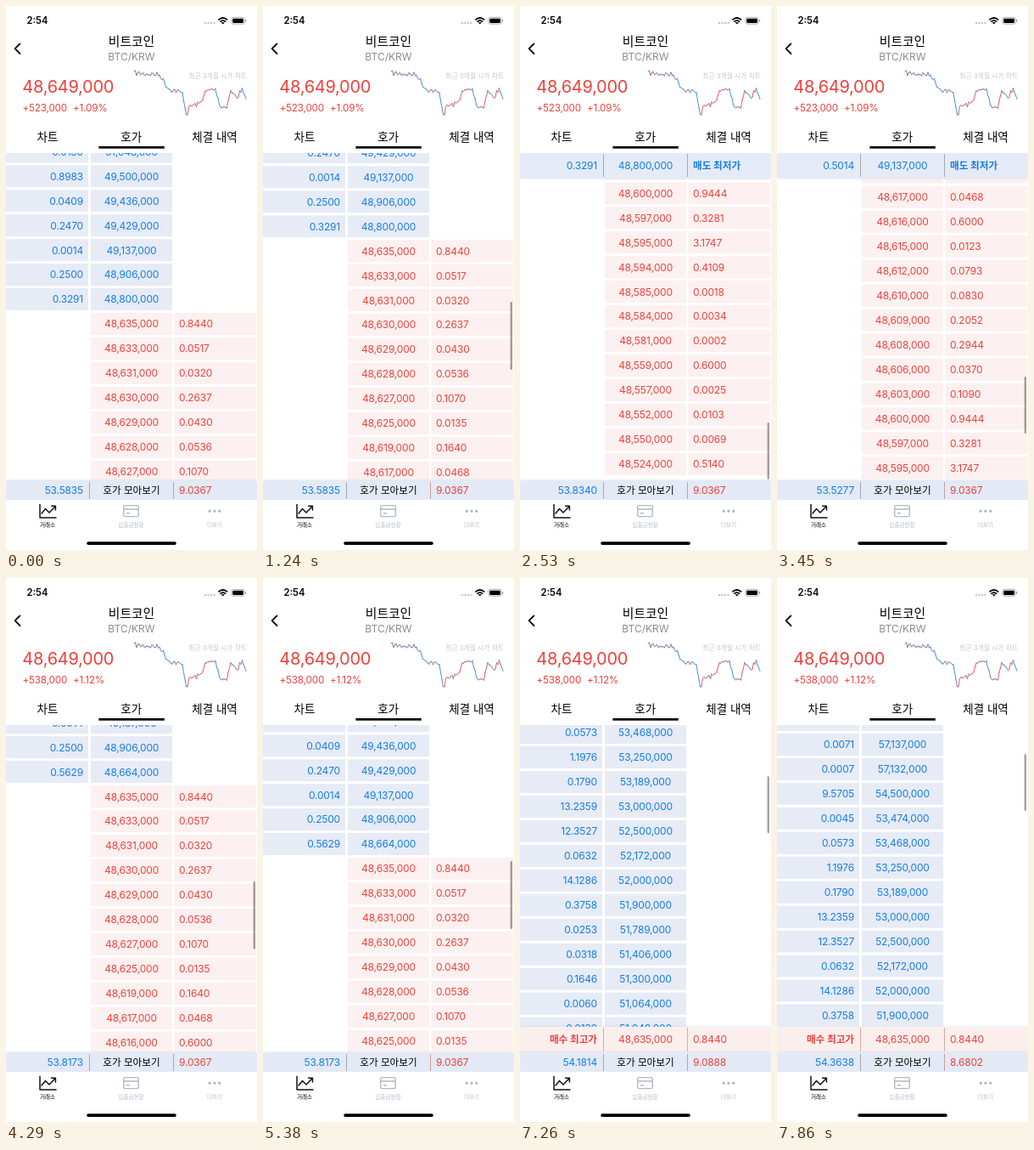
Recreate the animation shown at these times as an HTML page. Size 296 by 640 pixels, loop 8000 ms.

```html
<!DOCTYPE html>
<html lang="ko">
<head>
<meta charset="utf-8">
<title>호가</title>
<style>
html, body { margin: 0; width: 100%; height: 100%; overflow: hidden; background: #fff; }
svg { display: block; width: 296px; height: 640px; }
text { font-family: Inter, "Noto Sans CJK KR", "Noto Sans CJK JP", "Noto Sans CJK", sans-serif; }
.num { font-size: 12px; letter-spacing: -.18px; }
.small { font-size: 11.7px; }
.ko { font-size: 11.6px; }
.bold { font-weight: 700; }
.mid { text-anchor: middle; }
.end { text-anchor: end; }
.ask { fill: #147de8; }
.bid { fill: #ee403c; }
.ask-bg { fill: #e6ebf5; }
.bid-bg { fill: #fcf1f0; }
.tab { font-size: 13.5px; }
.nav { font-size: 6.6px; }
.off { fill: #b4b8c6; }
.rule { stroke: #a3a8b2; stroke-width: 1; }
</style>
</head>
<body>
<svg viewBox="0 0 296 640">
  <defs>
    <clipPath id="view"><rect y="173" width="296" height="385"/></clipPath>
    <filter id="soft" x="-5%" y="-30%" width="110%" height="160%">
      <feDropShadow dx="0" dy="0" stdDeviation="1.2" flood-color="#506080" flood-opacity=".22"/>
    </filter>
  </defs>
  <rect width="296" height="640" fill="#fff"/>

  <g clip-path="url(#view)"><g id="book"></g></g>

  <g id="topBar">
    <rect y="173" width="296" height="30" rx="3" fill="#e4ebf6" filter="url(#soft)"/>
    <path class="rule" d="M98.5 174V201M197.5 174V201"/>
    <text id="topQty" class="num ask end" x="91" y="191.5"></text>
    <text id="topPrice" class="num ask mid" x="148" y="191.5"></text>
    <text class="ko ask bold" x="204" y="191.5">매도 최저가</text>
  </g>
  <g id="lowBar">
    <rect y="528" width="296" height="30" rx="3" fill="#fbefee" filter="url(#soft)"/>
    <path class="rule" d="M98.5 529V557M197.5 529V557" style="stroke:#d9a9a8"/>
    <text class="ko bid bold end" x="91" y="547.3">매수 최고가</text>
    <text class="num bid mid" x="148" y="547.4">48,635,000</text>
    <text class="num bid" x="204" y="547.4">0.8440</text>
  </g>
  <rect id="thumb" x="291.6" width="2.4" rx="1.2" fill="#000" fill-opacity=".36"/>

  <rect y="558" width="296" height="23" rx="3" fill="#e3eaf5" filter="url(#soft)"/>
  <path class="rule" d="M98.5 560V580"/>
  <path class="rule" d="M197.5 560V580" style="stroke:#d09a9c"/>
  <text id="askSum" class="num ask end" x="91" y="573.8"></text>
  <text class="ko mid" x="148" y="573.6">호가 모아보기</text>
  <text id="bidSum" class="num bid" x="204" y="573.8"></text>

  <rect width="296" height="173" fill="#fff"/>
  <text x="24.5" y="21.4" font-size="11.2" font-weight="600">2:54</text>
  <path d="M235 20H246" stroke="#c4c4c6" stroke-width="2.4" stroke-linecap="round" stroke-dasharray="0 3.5"/>
  <g fill="none" stroke="#000" stroke-width="1.7">
    <path d="M250.4 16.4Q255.8 11.6 261.2 16.4M252.4 18.6Q255.8 15.7 259.2 18.6"/>
    <path d="M254.3 19.6H257.3L255.8 21.2Z" fill="#000" stroke-width=".7"/>
  </g>
  <rect x="265.9" y="13.4" width="15.4" height="7.8" rx="2.2" fill="none" stroke="#999" stroke-width=".8"/>
  <rect x="267.2" y="14.7" width="12.8" height="5.2" rx="1.1"/>
  <rect x="282" y="16" width="1.2" height="2.6" rx=".6" fill="#999"/>

  <path d="M16.4 44.4L10.6 50.2L16.4 56" fill="none" stroke="#000" stroke-width="1.8" stroke-linecap="round" stroke-linejoin="round"/>
  <text class="mid" x="148" y="47.4" font-size="14.8">비트코인</text>
  <text class="mid" x="148" y="64.4" font-size="12" fill="#8c8c8f">BTC/KRW</text>
  <text class="bid" x="19.3" y="102.2" font-size="20" letter-spacing="-.25">48,649,000</text>
  <text id="diff" class="num small bid" x="19.5" y="124"></text>
  <text id="rate" class="num small bid" x="79" y="124"></text>
  <text class="end" x="284" y="84.8" font-size="7.8" fill="#c3c7d3">최근 3개월 시가 차트</text>
  <g id="chart" fill="none" stroke-linecap="round"></g>

  <text class="tab mid" x="49" y="158.8">차트</text>
  <text class="tab mid" x="147.7" y="158.8">호가</text>
  <text class="tab mid" x="246" y="158.8">체결 내역</text>
  <rect x="109.4" y="165" width="77.4" height="2.7"/>

  <rect y="581" width="296" height="59" fill="#fff"/>
  <g fill="none" stroke="#111" stroke-width="1.5" stroke-linejoin="round" stroke-linecap="round">
    <path d="M40 586.5V602H59"/>
    <path d="M42 597L46.5 591.5L51 596L58 588.8M53.6 588.3H58.4V593"/>
  </g>
  <g fill="none" stroke="#b4b8c6" stroke-width="1.4">
    <rect x="138.7" y="587.6" width="17.6" height="13" rx="1.6"/>
    <path d="M139 592H156M142 596.8H146"/>
    <path d="M240.2 594.2H252" stroke-width="3.4" stroke-linecap="round" stroke-dasharray="0 5.8"/>
  </g>
  <text class="nav mid" x="49" y="612.5">거래소</text>
  <text class="nav mid off" x="147.5" y="612.5">입출금현황</text>
  <text class="nav mid off" x="246" y="612.5">더보기</text>
  <rect x="95.2" y="630.2" width="105.6" height="3.8" rx="1.9"/>
</svg>

<script>
const LOOP = 8000, ROW = 28.96;
const $ = id => document.getElementById(id);

// Orders as "price in thousands:quantity", from high to low
const asks = `57200:0.0020 57137:0.0071 57132:0.0007 54500:9.5705 53474:0.0045 53468:0.0573
  53250:1.1976 53189:0.1790 53000:13.2359 52500:12.3527 52172:0.0632 52000:14.1286 51900:0.3758
  51789:0.0253 51406:0.0318 51300:0.1646 51064:0.0060 51048:0.0130 49500:0.8983 49436:0.0409
  49429:0.2470 49137:0.0014 48906:0.2500 48800:0.3291`.split(/\s+/);
const bids = `48635:0.8440 48633:0.0517 48631:0.0320 48630:0.2637 48629:0.0430 48628:0.0536
  48627:0.1070 48625:0.0135 48619:0.1640 48617:0.0468 48616:0.6000 48615:0.0123 48612:0.0793
  48610:0.0830 48609:0.2052 48608:0.2944 48606:0.0370 48603:0.1090 48600:0.9444 48597:0.3281
  48595:3.1747 48594:0.4109 48585:0.0018 48584:0.0034 48581:0.0002 48559:0.6000 48557:0.0025
  48552:0.0103 48550:0.0069 48524:0.5140`.split(/\s+/);

// Smooth curve through points that never overshoots them
function curve(points) {
  const slope = i => (points[i + 1][1] - points[i][1]) / (points[i + 1][0] - points[i][0]);
  const last = points.length - 1;
  const tangent = i => {
    if (i === 0 || i === last) return slope(Math.min(i, last - 1));
    const a = slope(i - 1), b = slope(i);
    return a * b > 0 ? 2 * a * b / (a + b) : 0;
  };
  return x => {
    const i = Math.max(0, points.findLastIndex(p => p[0] <= x));
    if (i === last) return points[last][1];
    const [x0, y0] = points[i], [x1, y1] = points[i + 1];
    const w = x1 - x0, u = (x - x0) / w, v = 1 - u;
    return y0 * v * v * (1 + 2 * u) + y1 * u * u * (3 - 2 * u)
      + w * u * v * (tangent(i) * v - tangent(i + 1) * u);
  };
}

// Centre of the first bid row over time
const scrollAt = curve([[0, 374], [950, 374], [1233, 286], [2430, -301], [2850, -301], [3450, -36],
  [4640, 331], [5270, 331], [5380, 342], [6230, 613], [6820, 730], [7200, 730], [7860, 862], [8000, 880]]);
const thumbAt = curve([[-301, 490], [-36, 436], [342, 333], [613, 259], [862, 207]]);
const trendAt = curve([[151, 79], [180, 81], [192, 97], [208, 103], [213, 127], [217, 118], [228, 115],
  [236, 101], [246, 98], [254, 119], [260, 118], [265, 101], [272, 107], [278, 99], [283, 112]]);

// Gestures: start, end, number of screen updates between
const gestures = [[1010, 2640, 15], [2910, 4640, 16], [5380, 6230, 8], [6230, 6820, 5], [7260, 8100, 7]];

function lastUpdate(t) {
  const g = gestures.findLast(([start]) => start <= t);
  if (!g) return { time: 0, moving: false };
  const [start, end, n] = g;
  const u = Math.min(1, Math.floor((t - start) / (end - start) * n + .04) / n);
  return { time: start + (end - start) * u, moving: u < 1 };
}

// First value, then pairs of time and next value
function pick(t, value, ...changes) {
  for (let i = 0; i < changes.length; i += 2) if (t >= changes[i]) value = changes[i + 1];
  return value;
}

function add(parent, tag, attrs, text = "") {
  const el = document.createElementNS("http://www.w3.org/2000/svg", tag);
  for (const k in attrs) el.setAttribute(k, attrs[k]);
  el.textContent = text;
  return parent.appendChild(el);
}

function addRow(order, y, side) {
  const [price, qty] = order.split(":"), ask = side === "ask";
  const box = (x, width) => add($("book"), "rect", { x, y: y - 13, width, height: 26, class: side + "-bg" });
  box(100, 96);
  ask ? box(0, 97) : box(198.5, 96.5);
  const label = (x, align, text) =>
    add($("book"), "text", { x, y: y + 4.4, class: `num ${side} ${align}` }, text);
  return [
    label(ask ? 91 : 204, ask ? "end" : "", qty),
    label(148, "mid", (price * 1000).toLocaleString("en-US"))
  ];
}

const askRows = asks.map((o, i) => addRow(o, (i - asks.length) * ROW, "ask"));
bids.forEach((o, i) => addRow(o, i * ROW, "bid"));
const [lastQty, lastPrice] = askRows.at(-1);

let seed = 7;
const random = () => (seed = seed * 16807 % 2147483647) / 2147483647;
let from = [151, 77];
for (let x = 152.5; x <= 283; x += 1.5) {
  const to = [x, trendAt(x) + (random() - .5) * 6];
  add($("chart"), "path", { d: `M${from}L${to}`, stroke: to[1] < from[1] ? "#ea5a58" : "#4a8fdc" });
  from = to;
}

function put(el, text) {
  if (el.textContent !== text) el.textContent = text;
}
const show = (el, on) => { el.style.display = on ? "" : "none"; };

function draw(now) {
  const { time: t, moving } = lastUpdate(now % LOOP);
  const y = scrollAt(t);
  const qty = pick(t, "0.3291", 3120, "0.5014", 3985, "0.5629");
  const price = pick(t, "48,800,000", 3120, "49,137,000", 3985, "48,664,000");

  $("book").setAttribute("transform", `translate(0 ${y.toFixed(1)})`);
  [lastQty, $("topQty")].forEach(el => put(el, qty));
  [lastPrice, $("topPrice")].forEach(el => put(el, price));
  put($("askSum"), pick(t, "53.5835", 1670, "53.8340", 3120, "53.5277", 3985, "53.8173", 5800, "54.1814", 7470, "54.3638"));
  put($("bidSum"), pick(t, "9.0367", 5800, "9.0888", 7470, "8.6802"));
  put($("diff"), pick(t, "+523,000", 3985, "+538,000"));
  put($("rate"), pick(t, "+1.09%", 3985, "+1.12%"));

  const top = y < 216, low = y > 543;
  show($("topBar"), top);
  show($("lowBar"), low);
  show($("thumb"), moving);
  $("thumb").setAttribute("y", thumbAt(y));
  $("thumb").setAttribute("height", top || low ? 67 : 80);
}

const start = performance.now();
function loop() {
  draw(performance.now() - start);
  requestAnimationFrame(loop);
}
loop();
</script>
</body>
</html>
```
